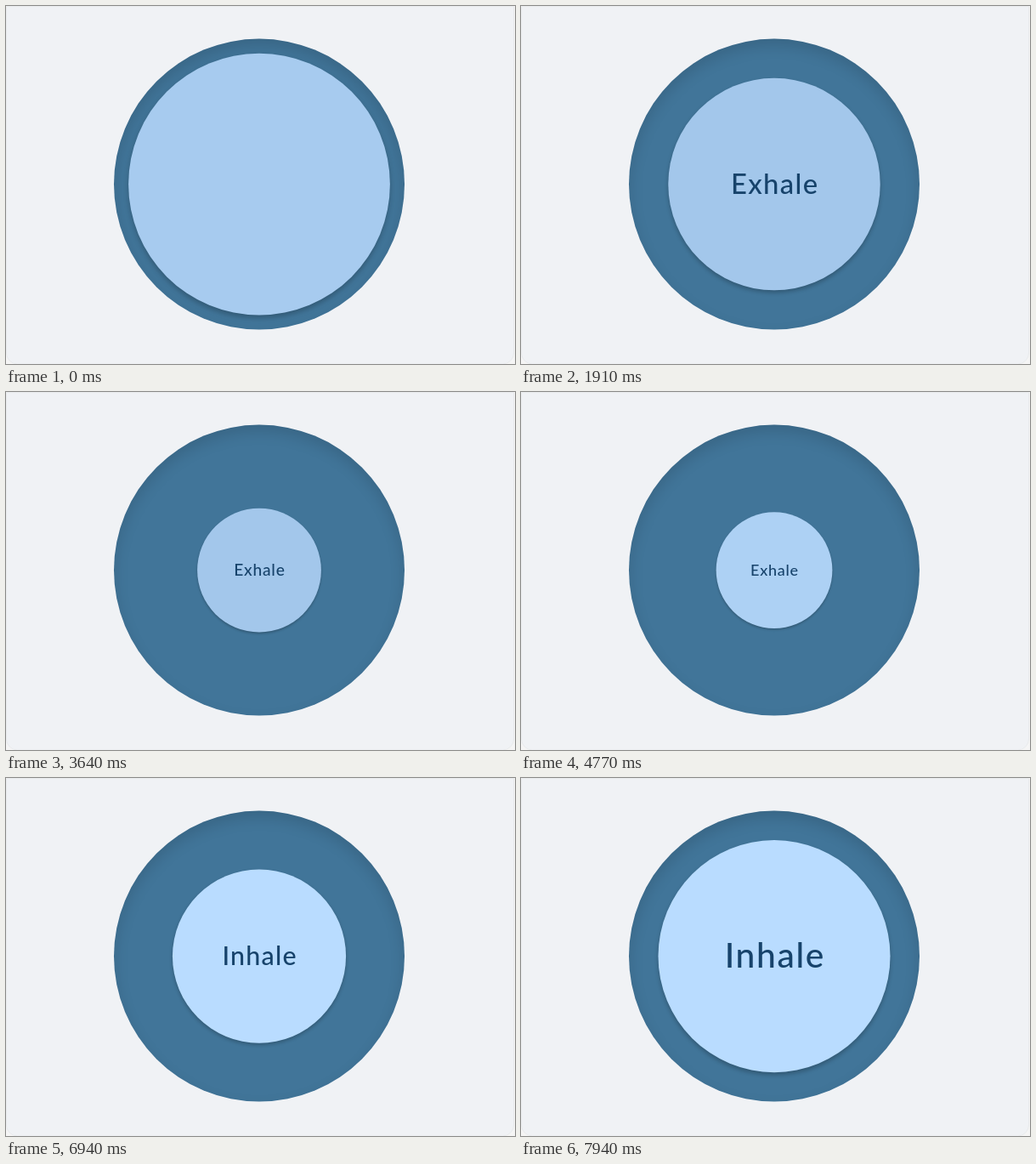
Write an HTML page with a canvas that moves like this. It is 599x421 px and loops after 8000 ms.

```html
<!DOCTYPE html>
<html lang="en">
<head>
<meta charset="utf-8">
<title>Breathing guide</title>
<style>
  html, body { margin: 0; width: 100%; height: 100%; overflow: hidden; background: #f5f5f5; }
  canvas { display: block; width: 599px; height: 421px; }
</style>
</head>
<body>
<canvas id="stage" width="599" height="421"></canvas>
<script>
const ctx = document.getElementById('stage').getContext('2d');
const LOOP = 8000, BREATH = 4000, EXHALE = 288, INHALE = 5190;
const CX = 298, CY = 209.6, R = 171;
const BIG = 0.9, SMALL = 0.4;
const FADE_LEAD = 710, FADE = 600;
const exhale = { label: 'Exhale', size: 45, rgb: [163, 199, 235] };
const inhale = { label: 'Inhale', size: 51, rgb: [185, 220, 255] };

const clamp = x => Math.min(1, Math.max(0, x));
const mix = (a, b, p) => a + (b - a) * p;
const ramp = (t, from, to) => clamp((t - from) / (to - from));

// cubic-bezier(.42, 0, .58, 1)
function ease(x) {
  let lo = 0, hi = 1;
  for (let i = 0; i < 24; i++) {
    const u = (lo + hi) / 2, v = 1 - u;
    if (1.26 * u * v * v + 1.74 * u * u * v + u * u * u < x) lo = u; else hi = u;
  }
  return lo * lo * (3 - 2 * lo);
}

function disc(r, fill) {
  ctx.beginPath();
  ctx.arc(CX, CY, r, 0, Math.PI * 2);
  ctx.fillStyle = fill;
  ctx.fill();
}

function drawCard() {
  ctx.fillStyle = '#f5f5f5';
  ctx.fillRect(0, 0, 599, 421);
  ctx.beginPath();
  ctx.roundRect(0.5, 0.5, 597, 420.5, [0, 0, 13, 13]);
  ctx.fillStyle = '#f0f2f5';
  ctx.fill();
  ctx.strokeStyle = '#e9ebed';
  ctx.stroke();
}

function drawWell() {
  disc(R, '#417599');
  ctx.save();
  ctx.clip();
  // inset shade along the upper rim
  ctx.shadowColor = 'rgba(0, 0, 0, .14)';
  ctx.shadowBlur = 18;
  ctx.shadowOffsetY = 8;
  ctx.beginPath();
  ctx.rect(0, -60, 599, 540);
  ctx.arc(CX, CY, R + 1, 0, Math.PI * 2, true);
  ctx.fillStyle = '#417599';
  ctx.fill();
  ctx.restore();
}

function drawBreath(scale, rgb, word, alpha) {
  ctx.save();
  ctx.shadowColor = 'rgba(0, 0, 0, .24)';
  ctx.shadowBlur = 7 * scale;
  ctx.shadowOffsetY = 4 * scale;
  disc(R * scale, `rgb(${rgb.map(Math.round)})`);
  ctx.restore();

  ctx.save();
  ctx.translate(CX, CY);
  ctx.scale(scale, scale);
  ctx.globalAlpha = alpha;
  ctx.font = `500 ${word.size}px Lato, sans-serif`;
  ctx.letterSpacing = word.size * 0.04 + 'px';
  ctx.textAlign = 'center';
  ctx.fillStyle = '#17436b';
  ctx.fillText(word.label, word.size * 0.02, word.size * 0.34);
  ctx.restore();
}

function render(t) {
  const breathingIn = t > 2500 + EXHALE;
  const start = breathingIn ? INHALE : EXHALE;
  const [before, after] = breathingIn ? [exhale, inhale] : [inhale, exhale];
  const lead = t - start;

  const out = ease(ramp(t, EXHALE, EXHALE + BREATH));
  const back = ease(ramp(t, INHALE, INHALE + BREATH));
  const scale = mix(BIG, SMALL, out - back);

  const p = ease(clamp((lead + FADE_LEAD) / FADE));
  const rgb = before.rgb.map((c, i) => mix(c, after.rgb[i], p));

  const swapped = lead > -290;
  const alpha = swapped ? ramp(lead, -270, -110) : 1 - ramp(lead, -410, -300);
  drawCard();
  drawWell();
  drawBreath(scale, rgb, swapped ? after : before, alpha);
}

function frame() {
  render(performance.now() % LOOP);
  requestAnimationFrame(frame);
}
frame();
</script>
</body>
</html>
```
